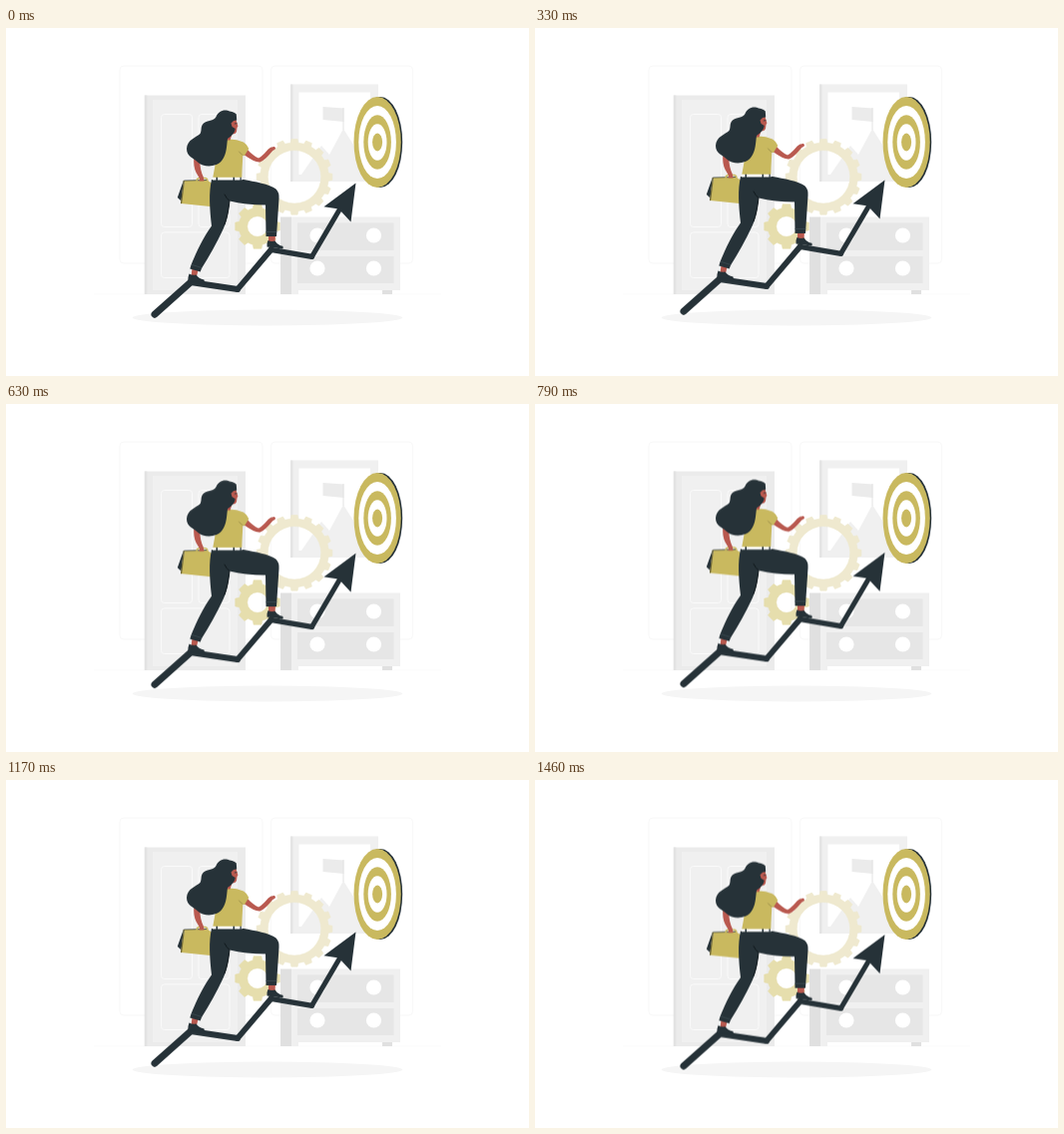
An HTML page that plays this animation: 524 px wide and 349 px high, repeating every 1500 ms.

```html
<!DOCTYPE html>
<html lang="en">
<head>
<meta charset="utf-8">
<title>Climbing to the target</title>
<style>
  html, body { margin: 0; width: 100%; height: 100%; overflow: hidden; background: #fff; }
  svg { display: block; width: 524px; height: 349px; }
  .gold { fill: #c9b95f; }
  .dark { fill: #263238; }
  .skin { fill: #b9594f; }
  .white { fill: #fff; }
  .line { fill: none; stroke-linecap: round; stroke-linejoin: round; }
</style>
</head>
<body>
<svg viewBox="0 0 524 349">
  <g fill="none" stroke="#ebebeb" stroke-width=".35">
    <rect x="114" y="38" width="143" height="198" rx="4"/>
    <rect x="265.5" y="38" width="142" height="198" rx="4"/>
    <path d="M88 267H436" stroke-width=".17"/>
  </g>

  <g id="door">
    <path fill="#ebebeb" d="M139 67.500H240V267H139z"/>
    <path fill="#e2e2e2" d="M138.700 67.500H141.300V267H138.700z"/>
    <path fill="#f0f0f0" d="M147 72H232V263H147z"/>
    <g fill="none" stroke="#fafafa" stroke-width="1">
      <rect x="155.500" y="86.500" width="31" height="113" rx="3"/>
      <rect x="193" y="86.500" width="31" height="113" rx="3"/>
      <rect x="155.500" y="205" width="68.500" height="45.500" rx="3"/>
    </g>
  </g>

  <g id="picture">
    <path fill="#f0f0f0" d="M285 56.500H373V154H285z"/>
    <path fill="#e4e4e4" d="M285 56.500H287.500V154H285z"/>
    <path class="white" d="M293.500 64.500H365V147H293.500z"/>
    <path fill="#f0f0f0" d="M296 147L316 118 324 127 338 101 365 144V147z"/>
    <path fill="#ebebeb" d="M317.500 79L338.500 80.500V94L317.500 92z"/>
    <path fill="#e4e4e4" d="M337.500 80H338.500V102H337.500z"/>
  </g>

  <g id="cabinet">
    <path fill="#f0f0f0" d="M286 189.500H395V263H293V267H286z"/>
    <path fill="#e0e0e0" d="M275 189.500H286V267H275zM377 263H387V267H377z"/>
    <path fill="#e6e6e6" d="M292 195.500H388.500V223H292zM292 229H388.500V256H292z"/>
    <g class="white">
      <circle cx="312" cy="208" r="7.600"/><circle cx="368.500" cy="208" r="7.600"/>
      <circle cx="312" cy="241" r="7.600"/><circle cx="368.500" cy="241" r="7.600"/>
    </g>
  </g>

  <ellipse cx="262" cy="290.500" rx="135.300" ry="7.900" fill="#f5f5f5"/>
  <g id="gears" fill-rule="evenodd"></g>
  <g id="target"><ellipse class="dark" cx="375" cy="114.500" rx="22.200" ry="45.500"/></g>

  <g id="climber">
    <g id="arrow" class="line" stroke="#263238"></g>
    <path class="dark" d="M350.500 155.500L318.500 179.300 333.500 181.500 345.500 194.500z"/>

    <!-- briefcase and rear arm -->
    <path class="dark" d="M178 152.500L171.800 170 175.500 173.500z"/>
    <path class="gold" d="M179 153L201 152.500 207 156V179.300L175.300 176z"/>
    <path class="line" stroke="#6b6434" stroke-width="1.300" d="M178.300 153.500L175.600 175.500"/>
    <path class="line" stroke="#263238" stroke-width=".7" d="M179 153L201 152.500"/>
    <path class="line" stroke="#c9b95f" stroke-width="1.300" d="M191 153.500Q191 150.500 194 150.500H199Q202 150.500 202 153.500"/>
    <path class="skin" d="M188.300 130Q187.500 139 190.500 145L194 151 193.500 153.500 198.500 153.500 197.800 149.500Q194.500 143 194.300 134z"/>

    <!-- ankles and shoes -->
    <path class="skin" d="M186.500 241L192.500 243 191 249H185.500zM263 207H270L269.500 215H263z"/>
    <path class="dark" d="M183.500 246.500Q187 248.500 190.500 247.500 193 251.500 198.500 252.500 199.500 254.500 198 255L182.300 254.500Q182 250 183.500 246.500z"/>
    <path class="dark" d="M262.500 213Q266 214.500 269.500 213.500 272.500 218 277.300 218.800 278.500 220.500 277 221.500L261.500 219.500Q261 216 262.500 213z"/>

    <!-- trousers -->
    <path class="dark" d="M206 152H238C249 154 264 156.500 270.500 161.500Q274 165 273.500 171L271 209H260.500L260 177.500Q240 177.500 224 173.500C223 184 221 196 216.500 204Q208 222 196 241L194.700 244.500 184.300 241.500 185.500 237.500C191 224 198 209 206 198.500 204 181 203 165 206 152z"/>
    <path class="line" stroke="#11191d" stroke-width="1" d="M219 167Q221 171 224 173.500 222.500 188 219 197"/>
    <path class="line" stroke="#46545b" stroke-width=".6" d="M186.500 237.500L196 240.500M260.500 204.500H271"/>
    <path class="white" d="M207.500 149.500H236.500V152.500H206.800z"/>
    <path class="dark" d="M210.500 149H212V153H210.500zM227.500 149H229V153H227.500zM234.500 149H235.700V153H234.500z"/>

    <!-- front arm and shirt -->
    <path class="skin" d="M241.500 121.500Q248 128.500 253 130.500 257 128.500 262.500 121.800 265 118.800 269 119 270.800 120 269.500 121.800 267 122.500 265.500 125 259.500 132.500 254.500 134.500 250 135.500 237.500 126.500z"/>
    <path class="gold" d="M218 112Q229 110.500 238 114.500 241.500 116.500 243.300 121L238.800 128.300 237.300 127.500C237 135 236.500 142 236.300 149.700H207.300C209 140 211 130 212 122z"/>
    <path class="line" stroke="#8f8443" stroke-width=".6" d="M233.500 124Q235 126.500 237.300 127.500"/>

    <!-- head -->
    <path class="skin" d="M222 92H230.500L231.600 95.500 232.400 98.500 231.500 100 231 104Q230 106.500 226.500 106.500L224.500 112.500H219z"/>
    <path class="dark" d="M230.800 86.500C229 83.800 224 83.800 222 82.700 217 81.500 212.500 84 210.500 89 208 93.500 202 92.500 198 95.500 194.500 98.500 196.500 102.500 194.500 106 190 110 181.500 112 181 121 181 129 188 130.500 192 134.500 198 140 211 140 216.500 132.500 221.500 126 221 117 222 111 227 107.500 229.500 104.500 229.700 101L226.500 99 225.500 95.500 228 93 231.200 92.500z"/>
    <path class="line" stroke="#263238" stroke-width=".8" d="M229.300 96L231 95.700"/>
  </g>
</svg>
<script>
const byId = id => document.getElementById(id);

function add(parent, tag, attrs) {
  const el = document.createElementNS('http://www.w3.org/2000/svg', tag);
  for (const key in attrs) el.setAttribute(key, attrs[key]);
  byId(parent).append(el);
}

// Toothed ring; base and tip are tooth widths as shares of one pitch.
function gear(cx, cy, { teeth, body, outer, hole, base, tip, fill }) {
  const pitch = 2 * Math.PI / teeth;
  const at = (r, a) => (cx + r * Math.cos(a)).toFixed(2) + ' ' + (cy + r * Math.sin(a)).toFixed(2);
  const points = [];
  for (let i = 0; i < teeth; i++) {
    const a = i * pitch;
    for (const [r, share] of [[body, -base], [outer, -tip], [outer, tip], [body, base], [body, .5]])
      points.push(at(r, a + share * pitch));
  }
  const ring = `M${cx - hole} ${cy}a${hole} ${hole} 0 1 0 ${2 * hole} 0a${hole} ${hole} 0 1 0 ${-2 * hole} 0z`;
  add('gears', 'path', { d: `M${points.join('L')}z${ring}`, fill, stroke: fill, 'stroke-width': .6, 'stroke-linejoin': 'round' });
}

gear(289, 149.3, { teeth: 16, body: 34.3, outer: 38, hole: 26.7, base: .29, tip: .21, fill: '#efe9cf' });
gear(252, 199, { teeth: 8, body: 18.8, outer: 22.6, hole: 10.3, base: .32, tip: .22, fill: '#e6dead' });

[[23.6, 45.5], [18.8, 36.6], [13.8, 27.3], [9.4, 18.3], [5, 9]].forEach(([rx, ry], i) =>
  add('target', 'ellipse', { cx: 372.1, cy: 114.5, rx, ry, class: i % 2 ? 'white' : 'gold' }));

const bends = [[149, 287.2], [185, 255], [232, 262], [265.5, 222.3], [306.5, 229.3], [336, 179]];
const widths = [7, 6, 5.8, 5.4, 5];
widths.forEach((w, i) =>
  add('arrow', 'path', { d: `M${bends[i]}L${bends[i + 1]}`, 'stroke-width': w }));

// Linear rise and fall at 24 pictures a second.
byId('climber').animate([
  { transform: 'translateY(0)', easing: 'steps(18)' },
  { transform: 'translateY(-6.98px)', easing: 'steps(18)' },
  { transform: 'translateY(0)' }
], { duration: 1500, delay: -5, iterations: Infinity });
</script>
</body>
</html>
```
